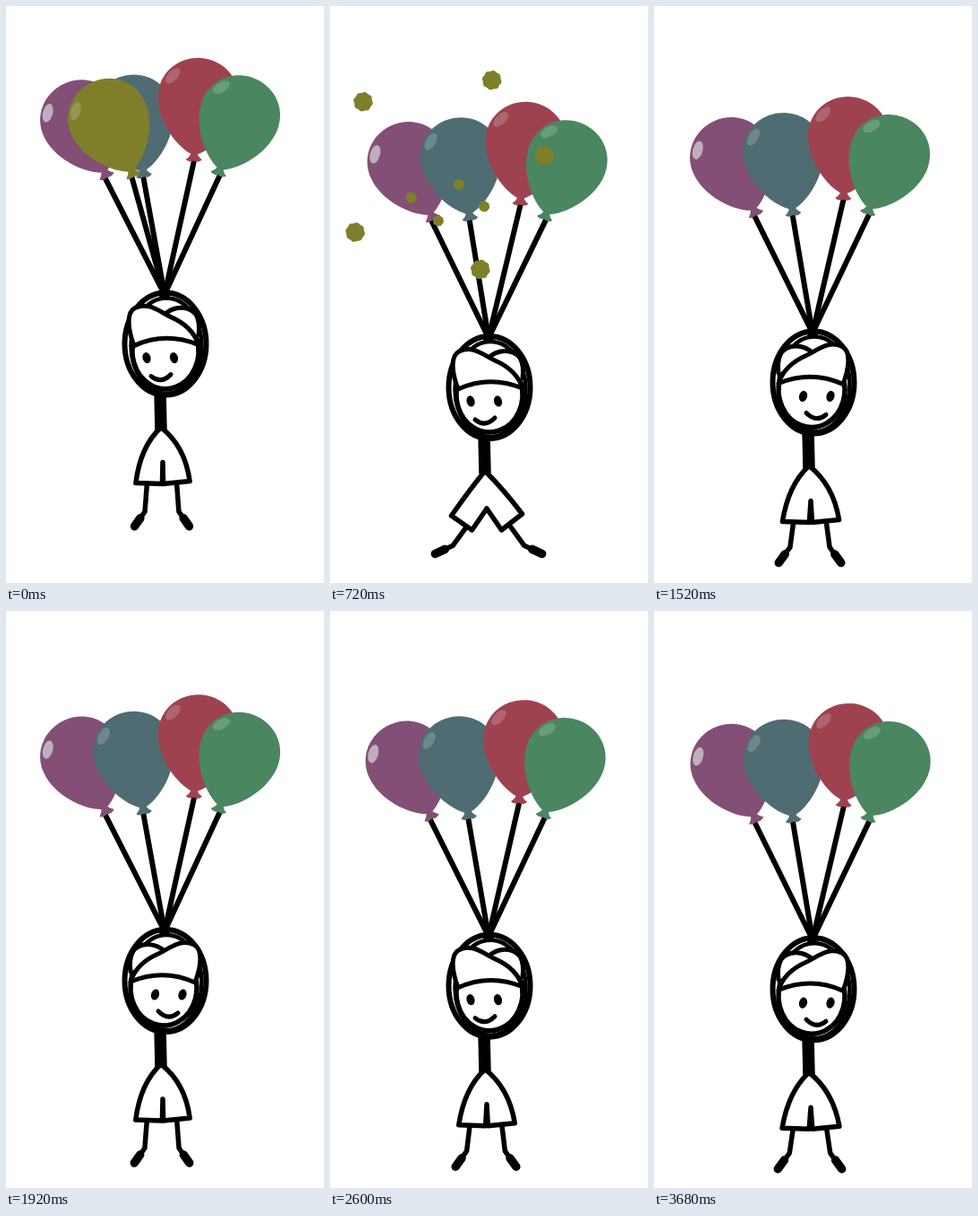
Write an HTML page with a canvas that moves like this. It is 355x643 px and loops after 3720 ms.

```html
<!DOCTYPE html>
<html lang="en">
<head>
<meta charset="utf-8">
<title>Balloon ride</title>
<style>
html, body { margin: 0; width: 100%; height: 100%; overflow: hidden; background: #fff; }
canvas { display: block; }
</style>
</head>
<body>
<canvas id="stage" width="355" height="643"></canvas>
<script>
const ctx = document.getElementById('stage').getContext('2d');
const LOOP = 3720, STEP = 40, BOB = 2240, TURN = BOB / 2;
const POP = 440, FALL = 560, LAND = 720;
const OLIVE = '#7f7f2a';
const KNOT = { x: 177, y: 321 };
const MID = 174;

// x and y are the neck, tilt is in degrees
const balloons = [
  { x: 110, y: 184, tilt: -25, color: '#834f76', gloss: .55 },
  { x: 153, y: 183, tilt: -10, color: '#4f6c73' },
  { x: 140, y: 183, tilt: -24, color: OLIVE, pops: true },
  { x: 210, y: 165, tilt: 4, color: '#9f4250' },
  { x: 239, y: 181, tilt: 20, color: '#4a8660' }
];

const rad = d => d * Math.PI / 180;
const ramp = (t, a, b) => Math.max(0, Math.min(1, (t - a) / (b - a)));
const smooth = v => v * v * (3 - 2 * v);
const mix = (a, b, k) => a + (b - a) * k;

function stroke(d, width, fill) {
  const path = new Path2D(d);
  if (fill) { ctx.fillStyle = fill; ctx.fill(path); }
  ctx.lineWidth = width;
  ctx.stroke(path);
}

function ring(x, y, rx, ry, width, from = 0, to = 360) {
  ctx.beginPath();
  ctx.ellipse(x, y, rx, ry, 0, rad(from), rad(to));
  ctx.fillStyle = '#fff';
  ctx.fill();
  ctx.lineWidth = width;
  ctx.stroke();
}

function oval(x, y, rx, ry, tilt, color) {
  ctx.fillStyle = color;
  ctx.beginPath();
  ctx.ellipse(x, y, rx, ry, rad(tilt), 0, 7);
  ctx.fill();
}

const skin = new Path2D('M0 1C-19-5-45-35-45-64C-45-90-24-108 0-108C24-108 45-90 45-64C45-35 19-5 0 1Z');
const lip = new Path2D('M-3-2L3-2Q5 3 9 5Q6 9 0 7Q-6 9-9 6Q-5 3-3-2Z');

function drawBalloon({ x, y, tilt, color, gloss = .19 }) {
  ctx.save();
  ctx.translate(x, y);
  ctx.rotate(rad(tilt));
  ctx.fillStyle = color;
  ctx.fill(skin);
  ctx.fill(lip);
  oval(-30, -86, 5.5, 10.5, 40, `rgba(240,255,245,${gloss})`);
  ctx.restore();
}

function drawBalloons(bob, popped) {
  const shown = balloons.filter(b => !(b.pops && popped));
  ctx.save();
  ctx.translate(KNOT.x, KNOT.y);
  ctx.rotate(rad(1.25 * bob));
  ctx.translate(-KNOT.x, -KNOT.y);
  for (const b of shown) stroke(`M${b.x} ${b.y + 6}L${KNOT.x} ${KNOT.y}`, 6);
  shown.forEach(drawBalloon);
  ctx.restore();
  oval(KNOT.x, KNOT.y + 1, 6, 5, 0, '#000');
}

function drawLeg(side, bob, kick) {
  const pose = (low, rise, kicked) => mix(low + rise * bob, kicked, kick);
  const swing = ([x, y], angle, length) =>
    [x + side * length * Math.sin(rad(angle)), y + length * Math.cos(rad(angle))];
  const hip = [MID + 3 * kick + side * pose(16.5, 3.5, 25), 532];
  const knee = swing(hip, pose(4, 7, 36), pose(31, -6, 25));
  const shin = pose(35, 2, 65), length = pose(20, 3, 22);
  const toe = swing(knee, shin, length);
  stroke(`M${hip}L${knee}L${toe}`, 5.5);
  stroke(`M${swing(knee, shin, length * .45)}L${toe}`, 9.5);
}

function drawShorts(bob, kick) {
  const wide = mix(30 + 3 * bob, 39.5, kick);
  const slit = mix(.5 + 2 * bob, 16.5, kick);
  const hem = mix(531, 519, kick), inner = mix(532, 535, kick);
  const curve = mix(25, 19, kick);
  const x = MID + 1;
  stroke(`M173 469Q${x - curve} 490 ${x - wide} ${hem}L${x - slit} ${inner}L${x} ${508 + 3 * kick}
    L${x + slit} ${inner}L${x + wide} ${hem - 2}Q${x + curve} 490 173 469Z`, 5.5, '#fff');
}

function drawBody(bob, kick) {
  drawLeg(-1, bob, kick);
  drawLeg(1, bob, kick);
  drawShorts(bob, kick);
  ctx.lineCap = 'butt';
  stroke('M172 430L173 472', 13.5);
  ctx.lineCap = 'round';
}

function drawHead(turned) {
  ring(178, 376, 45.5, 57, 6);
  ring(179, 378, 39.5, 53, 4.5);
  ctx.save();
  if (turned) {
    ctx.translate(2 * KNOT.x, 0);
    ctx.scale(-1, 1);
  }
  ring(178, 384, 37, 42, 5.5, -18, 198);
  stroke('M176 344C186 334 203 332 212 343Q217 352 215 366', 5, '#fff');
  stroke('M143 378C136 360 134 341 144 336C160 328 174 342 184 346C198 352 210 362 215 377Q178 362 143 378Z', 5, '#fff');
  for (const x of [157, 187.5]) oval(x, 391.5, 4.5, 6.2, -16, '#000');
  stroke('M162 412Q173 421 184 410', 5);
  ctx.restore();
}

function drawScrap(x, y, r) {
  ctx.beginPath();
  for (let a = 0; a < 360; a += 10) {
    const q = r * (1 + .05 * Math.sin(rad(8 * a)));
    ctx.lineTo(x + q * Math.cos(rad(a)), y + q * Math.sin(rad(a)));
  }
  ctx.fill();
}

// Five large scraps fly out in a circle, four small ones drop in a flat ring.
function drawScraps(t) {
  if (t < POP || t > 840) return;
  const out = 1 - (1 - ramp(t, POP, LAND)) ** 3;
  const size = mix(.6, 1, out) * (1 - ramp(t, LAND, 860));
  const burst = (count, x, y, rx, ry, first, turn, r) => {
    for (let n = 0; n < count; n++) {
      const a = rad(first + turn * n);
      drawScrap(mix(114, x + rx * Math.cos(a), out), mix(130, y + ry * Math.sin(a), out), r * size);
    }
  };
  ctx.fillStyle = OLIVE;
  burst(5, 124, 185, 117, 117, -9, 77, 10.5);
  burst(4, 131, 219, 42, 21, 12, 92, 6);
}

function draw(t) {
  const bob = .5 - .5 * Math.cos(2 * Math.PI * (t + 140) / BOB);
  const fall = smooth(ramp(t, FALL, LAND));
  const kick = smooth(ramp(t, FALL, 690)) * (1 - smooth(ramp(t, 740, 960)));
  ctx.fillStyle = '#fff';
  ctx.fillRect(0, 0, 355, 643);
  ctx.strokeStyle = '#000';
  ctx.lineCap = ctx.lineJoin = 'round';
  ctx.save();
  ctx.translate(0, 16 * bob + 35 * fall);
  drawBody(bob, kick);
  drawHead(Math.floor(t / TURN) % 2 === 1);
  drawBalloons(bob, t >= POP);
  ctx.restore();
  drawScraps(t);
}

const start = performance.now();
function tick() {
  const t = (performance.now() - start) % LOOP;
  draw(Math.floor(t / STEP) * STEP);
  requestAnimationFrame(tick);
}
tick();
</script>
</body>
</html>
```
